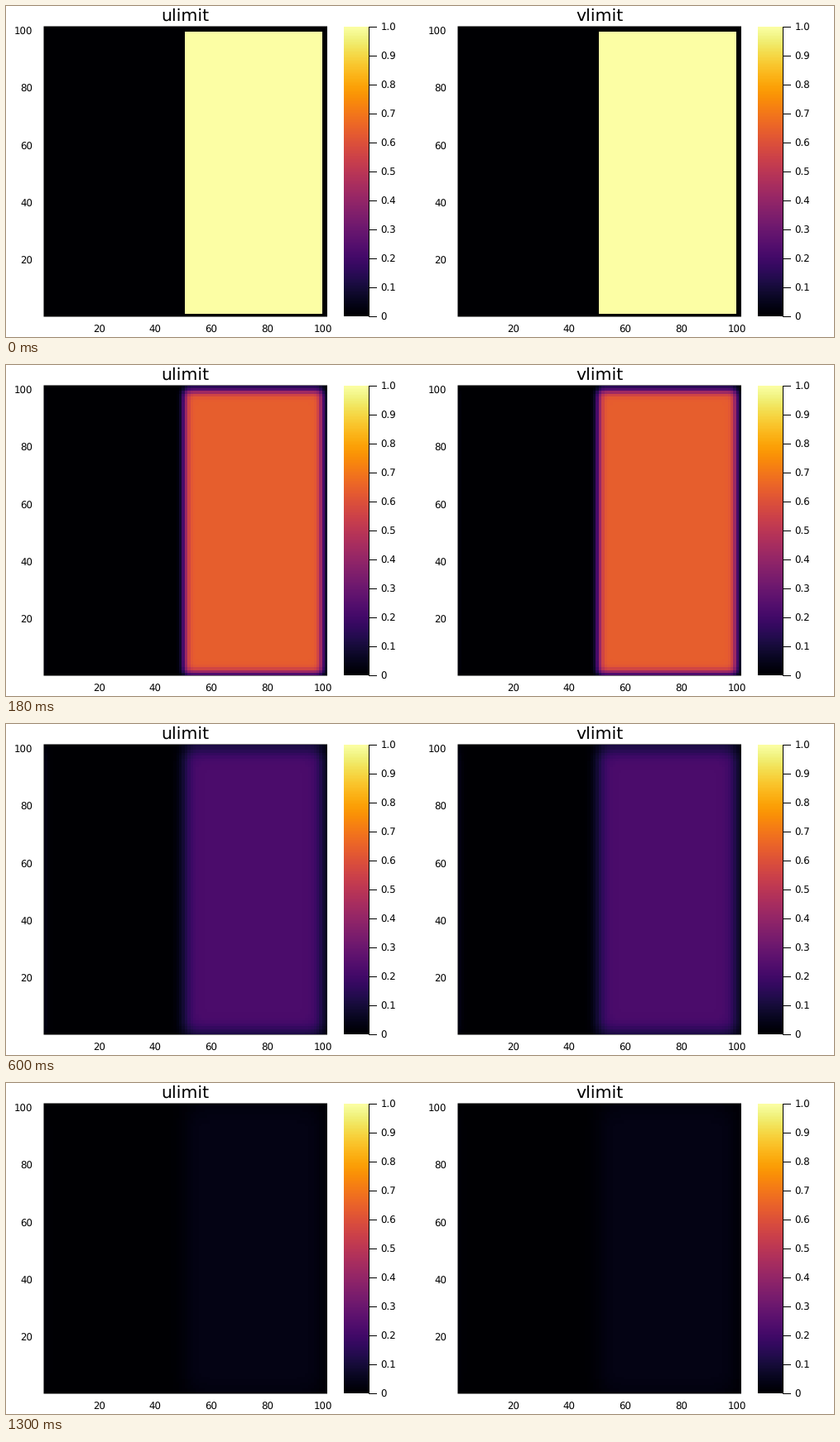
Write a matplotlib script that moves like this. It is 1000 px wide and 400 px high and loops after 2020 ms.

```python
import numpy as np
import matplotlib.pyplot as plt
from matplotlib.animation import FuncAnimation
from matplotlib.patches import Rectangle

W, H, DPI = 1000, 400, 100
CELLS, FRAMES, STEP_MS = 101, 101, 20
DECAY, DIFFUSION, SUBSTEPS = 0.05, 0.1, 4
LEFT, RIGHT, TOP, BOTTOM = 46, 388, 25, 375

plt.rcParams["font.family"] = "DejaVu Sans"
plt.rcParams["text.hinting"] = "none"


def simulate():
    """Diffusing and decaying block on a periodic grid."""
    u = np.zeros((CELLS, CELLS))
    u[1:99, 50:99] = 1
    states = [u]
    d = DIFFUSION / SUBSTEPS
    for _ in range(FRAMES - 1):
        for _ in range(SUBSTEPS):
            around = sum(np.roll(u, s, axis) for s in (1, -1) for axis in (0, 1))
            u = u + d * (around - 4 * u)
        u = u * np.exp(-DECAY)
        states.append(u)
    return states


# Cell index of every pixel column and row of a heatmap.
width, height = RIGHT - LEFT, BOTTOM - TOP
cols = np.arange(width) * CELLS // width
rows = -(-np.arange(1, height + 1) * CELLS // (height + 1)) - 1


def to_pixels(u):
    return u[::-1][np.ix_(rows, cols)]


fig = plt.figure(figsize=(W / DPI, H / DPI), dpi=DPI, facecolor="white")
ax = fig.add_axes([0, 0, 1, 1])
ax.axis("off")


def label(x, y, text, px=11.8, ha="center"):
    ax.text(x, y, text, fontsize=px * 72 / DPI, ha=ha, va="baseline",
            color="black")


def line(xs, ys):
    ax.plot(xs, ys, color="black", lw=0.72, solid_capstyle="butt", snap=False)


def image(data, x0, x1, y0, y1):
    return ax.imshow(data, cmap="inferno", vmin=0, vmax=1, aspect="auto",
                     interpolation="nearest", extent=(x0, x1, y1, y0))


def panel(x, title, data):
    ax.add_patch(Rectangle((x + LEFT - 0.5, TOP - 0.5), width + 0.5, height + 1,
                           color="black", lw=0, snap=False, zorder=-1))
    heat = image(data, x + LEFT, x + RIGHT, TOP, BOTTOM)
    label(x + 216.6, 18, title, px=20.5)
    for v in range(20, 101, 20):
        label(x + LEFT + 0.4 + (v - 0.5) * width / CELLS, 394.4, str(v))
        label(x + 32.6, BOTTOM + 0.5 - (v - 0.5) * 3.47 + 4.3, str(v),
              ha="right")

    image(np.linspace(1, 0, 256)[:, None], x + 408, x + 438, TOP, BOTTOM)
    line([x + 438.5] * 2, [TOP, BOTTOM + 1])
    for i in range(11):
        y = BOTTOM + 0.5 - 35 * i
        line([x + 438, x + 448], [y, y])
        label(x + 452.3, y + 3.9, f"{i / 10:.1f}" if i else "0", ha="left")
    return heat


states = simulate()
heats = [panel(x, name, to_pixels(states[0]))
         for x, name in ((0, "ulimit"), (500, "vlimit"))]
ax.set_xlim(0, W)
ax.set_ylim(H, 0)


def update(n):
    pixels = to_pixels(states[n])
    for heat in heats:
        heat.set_data(pixels)
    return heats


anim = FuncAnimation(fig, update, frames=FRAMES, interval=STEP_MS,
                     repeat=True, repeat_delay=0, blit=False)
plt.show()
```
